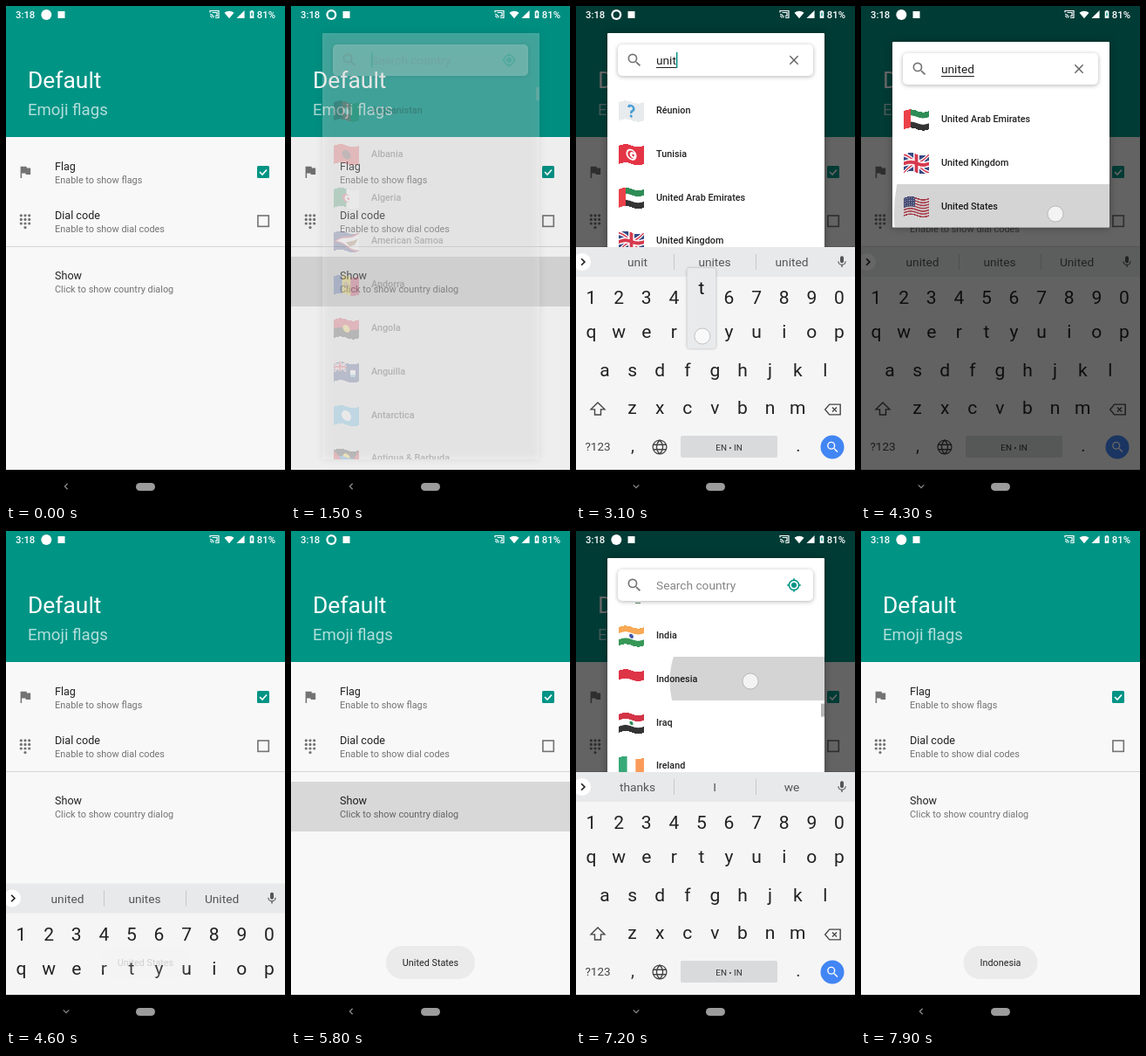
These frames come from a looping animation (320x569 px, 8900 ms). An HTML page with a canvas:

```html
<!DOCTYPE html>
<html lang="en">
<head>
<meta charset="utf-8">
<title>Country picker</title>
<style>
html, body { margin: 0; width: 100%; height: 100%; overflow: hidden; background: #000; }
canvas { display: block; }
</style>
</head>
<body>
<canvas id="stage" width="320" height="569"></canvas>
<script>
const LOOP = 8900, STEP = 100, TEAL = '#009485', GREY = '#737373', ROW = 49.8;
const stage = document.getElementById('stage').getContext('2d');
let c = stage, t = 0;

const ICON = {
  search: 'M15.5 14h-.79l-.28-.27A6.47 6.47 0 0 0 16 9.5 6.5 6.5 0 1 0 9.5 16c1.61 0 3.09-.59 4.23-1.57l.27.28v.79l5 4.99L20.49 19zm-6 0A4.5 4.5 0 1 1 14 9.5 4.5 4.5 0 0 1 9.5 14z',
  flag: 'M14.4 6L14 4H5v17h2v-7h5.6l.4 2h7V6z',
  mic: 'M12 14a3 3 0 0 0 3-3V5a3 3 0 0 0-6 0v6a3 3 0 0 0 3 3zm5.3-3a5.3 5.3 0 0 1-10.6 0H5a7 7 0 0 0 6 6.7V21h2v-3.3A7 7 0 0 0 19 11z',
  wifi: 'M12 21L0 7C7 1 17 1 24 7z',
  signal: 'M2 22h20V2z',
  battery: 'M7 4h3V2h4v2h3v18H7z',
  cast: 'M2 8V4h20v16h-8M2 16a4 4 0 0 1 4 4M2 12a8 8 0 0 1 8 8M7 8h11v8h-5',
  shift: 'M12 4l9 9h-5v7H8v-7H3z',
  erase: 'M8 5h15v14H8l-6-7zM12 9l6 6m0-6l-6 6',
  globe: 'M2 12a10 10 0 1 0 20 0a10 10 0 1 0-20 0M3 8.5h18M3 15.5h18M12 2c-6 6-6 14 0 20c6-6 6-14 0-20',
  locate: 'M4 12a8 8 0 1 0 16 0a8 8 0 1 0-16 0M12 1v3M12 20v3M1 12h3M20 12h3',
  close: 'M5 5l14 14M19 5L5 19',
  right: 'M9 6l6 6-6 6', left: 'M15 6l-6 6 6 6', down: 'M6 9l6 6 6-6',
  check: 'M4 12l6 6L20 7'
};

// name, band direction, band colours, optional emblem: colour x y radius
const countries = [
  ['Afghanistan', 'v', '#222 #c81e28 #007a3d', '#e9d3cf 14.5 10 3.5'],
  ['Albania', 'h', '#dc1f26', '#401515 14.5 10 5'],
  ['Algeria', 'v', '#0a7a42 #fff', '#d8203a 14.5 10 4.5'],
  ['American Samoa'],
  ['Andorra', 'v', '#1c3d9a #f7d417 #d0103a', '#b98a3a 14.5 10 3'],
  ['Angola', 'h', '#cc1126 #111', '#f3c531 14.5 10 4'],
  ['Anguilla'],
  ['Antarctica', 'h', '#3aa8dc', '#fff 14.5 10 5.5'],
  ['Antigua & Barbuda'],
  ['Argentina', 'h', '#75aadb #fff #75aadb', '#f5b52e 14.5 10 2.5'],
  ['Austria', 'h', '#d8202f #fff #d8202f'],
  ['Bangladesh', 'h', '#0a6a4e', '#e8304a 13 10 5.5'],
  ['Belgium', 'v', '#111 #f8d93a #e02b39'],
  ['Bolivia', 'h', '#d0301e #f6e000 #0a7a34'],
  ['Bulgaria', 'h', '#fff #0a9470 #d22b1e'],
  ['Chad', 'v', '#0a2a66 #fbc816 #c41030'],
  ['Estonia', 'h', '#2072c5 #111 #fff'],
  ['France', 'v', '#1c2f8c #fff #e5303c'],
  ['Germany', 'h', '#111 #d81010 #fbcb09'],
  ['Guinea', 'v', '#c81a28 #f9d116 #0a9458'],
  ['Hungary', 'h', '#c8303e #fff #43704d'],
  ['India', 'h', '#f79a35 #fff #15873a', '#23369b 14.5 10 2.4'],
  ['Indonesia', 'h', '#d81126 #fff'],
  ['Iraq', 'h', '#cc1126 #fff #111', '#0a7a3d 14.5 10 2'],
  ['Ireland', 'v', '#169b62 #fff #fb8a3e'],
  ['Italy', 'v', '#0a9246 #fff #cd2c38'],
  ['Réunion'],
  ['Tunisia'],
  ['United Arab Emirates'],
  ['United Kingdom'],
  ['United States']
];

const ramp = (a, b) => Math.min(1, Math.max(0, (t - a) / (b - a)));
const easeOut = p => 1 - (1 - p) ** 3;
const between = (a, b) => t >= a && t < b;

function rect(x, y, w, h, color, r = 0) {
  c.fillStyle = color;
  c.beginPath();
  c.roundRect(x, y, w, h, r);
  c.fill();
}
function disc(x, y, r, color) {
  c.fillStyle = color;
  c.beginPath();
  c.arc(x, y, r, 0, 7);
  c.fill();
}
function poly(color, ...xy) {
  c.fillStyle = color;
  c.beginPath();
  for (let i = 0; i < xy.length; i += 2) c.lineTo(xy[i], xy[i + 1]);
  c.fill();
}
function line(x1, y1, x2, y2, color, w) {
  c.strokeStyle = color;
  c.lineWidth = w;
  c.beginPath();
  c.moveTo(x1, y1);
  c.lineTo(x2, y2);
  c.stroke();
}
function text(s, x, y, size, color = '#222', align = 'left', weight = 400) {
  c.font = `${weight} ${size}px Roboto, sans-serif`;
  c.textAlign = align;
  c.fillStyle = color;
  c.fillText(s, x, y);
}
function icon(name, x, y, size, color, stroke) {
  const path = new Path2D(ICON[name]);
  c.save();
  c.translate(x, y);
  c.scale(size / 24, size / 24);
  c.translate(-12, -12);
  if (stroke) {
    c.strokeStyle = color;
    c.lineWidth = stroke * 24 / size;
    c.stroke(path);
  } else {
    c.fillStyle = color;
    c.fill(path, 'evenodd');
  }
  c.restore();
}
function clipped(x, y, w, h, draw) {
  c.save();
  c.beginPath();
  c.rect(x, y, w, h);
  c.clip();
  draw();
  c.restore();
}

function crescent(x, y, r, color, back) {
  disc(x, y, r, color);
  disc(x + r * .35, y, r * .78, back);
  disc(x + r * .5, y, r * .3, color);
}
function unionJack(w, h) {
  clipped(0, 0, w, h, () => {
    rect(0, 0, w, h, '#12286e');
    for (const [color, k] of [['#fff', .2], ['#d01830', .07]]) {
      line(0, 0, w, h, color, h * k);
      line(0, h, w, 0, color, h * k);
    }
    for (const [color, k] of [['#fff', .34], ['#d01830', .19]]) {
      line(w / 2, 0, w / 2, h, color, h * k);
      line(0, h / 2, w, h / 2, color, h * k);
    }
  });
}
const special = {
  'American Samoa'() {
    rect(0, 0, 29, 20, '#14226b');
    poly('#c0203a', 0, 10, 29, -1, 29, 21);
    poly('#fff', 3, 10, 29, 1, 29, 19);
    poly('#8a5a2c', 14, 11, 20, 8, 28, 6, 24, 12, 18, 14);
  },
  'Anguilla'() {
    rect(0, 0, 29, 20, '#14286e');
    unionJack(14.5, 10);
    rect(19, 6, 6, 8, '#fff', 2);
    rect(19, 11, 6, 3, '#4fb0d0', 1);
  },
  'Antigua & Barbuda'() {
    rect(0, 0, 29, 20, '#cc1126');
    poly('#111', 0, 0, 29, 0, 14.5, 20);
    disc(14.5, 8, 4, '#fbd116');
    poly('#1272c6', 6, 8, 23, 8, 14.5, 20);
    poly('#fff', 9.5, 13, 19.5, 13, 14.5, 20);
  },
  'Réunion'() {
    rect(0, 0, 29, 20, '#e4e8ea');
    text('?', 14.5, 17, 19, '#2a8fd0', 'center', 700);
  },
  'Tunisia'() {
    rect(0, 0, 29, 20, '#e01226');
    disc(14.5, 10, 6, '#fff');
    crescent(14.5, 10, 4.2, '#e01226', '#fff');
  },
  'United Arab Emirates'() {
    bands('h', ['#0a7a3a', '#fff', '#111']);
    rect(0, 0, 8, 20, '#e8202a');
  },
  'United Kingdom'() { unionJack(29, 20); },
  'United States'() {
    bands('h', Array.from({ length: 13 }, (_, i) => i % 2 ? '#fff' : '#c0283c'));
    rect(0, 0, 13, 10.8, '#2f3a76');
    for (let i = 0; i < 20; i++) disc(1.5 + i % 5 * 2.5, 1.6 + (i / 5 | 0) * 2.5, .5, '#fff');
  }
};
function bands(dir, colors) {
  const n = colors.length;
  colors.forEach((color, i) => dir === 'v'
    ? rect(i * 29 / n, 0, 29 / n + .1, 20, color)
    : rect(0, i * 20 / n, 29, 20 / n + .1, color));
}
const sheets = {};
function flagSheet([name, dir, colors, emblem]) {
  if (sheets[name]) return sheets[name];
  const sheet = document.createElement('canvas');
  sheet.width = 58;
  sheet.height = 40;
  c = sheet.getContext('2d');
  c.scale(2, 2);
  if (special[name]) special[name]();
  else bands(dir, colors.split(' '));
  if (emblem) {
    const [color, x, y, r] = emblem.split(' ');
    if (name === 'Algeria') crescent(+x, +y, +r, color, '#fff');
    else disc(+x, +y, +r, color);
  }
  c = stage;
  return sheets[name] = sheet;
}
function wavingFlag(country, x, y) {
  const sheet = flagSheet(country), alpha = c.globalAlpha;
  c.globalAlpha = alpha * .85;
  for (let i = 0; i < 29; i++)
    c.drawImage(sheet, i * 2, 0, 2, 40, x + i, y - 10 - 1.6 * Math.sin(i / 29 * 2 * Math.PI), 1, 21);
  c.globalAlpha = alpha;
}

// Typing
const strokes = [['u', 2200], ['n', 2500], ['i', 2800], ['t', 3000], ['e', 3300], ['d', 3700]];
const typedAt = time => time > 4800 ? '' : strokes.filter(s => s[1] <= time).map(s => s[0]).join('');
const suggestions = {
  '': 'thanks I we', u: 'u you us', un: 'un under until', uni: 'uni unit unique',
  unit: 'unit unites united', unite: 'unite unites united', united: 'united unites United'
};
const keyRows = [['1234567890', 17.5, 341], ['qwertyuiop', 17.5, 380], ['asdfghjkl', 33, 424], ['zxcvbnm', 64.5, 467]];
const keyX = (start, i) => start + i * 31.6;

function ripple(x, y, r, alpha) {
  disc(x, y, r, `rgba(0,0,0,${alpha})`);
}
function page() {
  rect(0, 0, 320, 569, '#f8f8f8');
  rect(0, 0, 320, 150, TEAL);
  text('Default', 25, 94, 26.4, '#fff');
  text('Emoji flags', 25, 125, 18.6, 'rgba(255,255,255,.7)');
  [['Flag', 'Enable to show flags', 188], ['Dial code', 'Enable to show dial codes', 244],
   ['Show', 'Click to show country dialog', 313]].forEach(([title, note, y]) => {
    text(title, 56, y, 12.6);
    text(note, 56, y + 15, 10.9, GREY);
  });
  icon('flag', 22, 190, 18.5, GREY);
  for (let i = 0; i < 9; i++) disc(17.3 + i % 3 * 4.7, 239.8 + (i / 3 | 0) * 4.6, 1.6, GREY);
  disc(22, 253.6, 1.6, GREY);
  rect(288, 183, 14, 14, TEAL, 1.5);
  icon('check', 295, 190, 12, '#fff', 1.6);
  c.strokeStyle = GREY;
  c.lineWidth = 1.6;
  c.strokeRect(288.9, 240, 12.4, 12.4);
  rect(0, 275, 320, 1, '#d4d4d4');
  for (const [down, full, fade, end] of [[1100, 1400, 1600, 1900], [5500, 5800, 6000, 6300]]) {
    if (between(down, end)) clipped(0, 287, 320, 57, () =>
      ripple(190, 316, 230 * ramp(down, full), .13 * (1 - ramp(fade, end))));
  }
}

function dialog(fade) {
  const second = t > 5000, typed = typedAt(t), query = typedAt(t - 150);
  const list = second ? countries : countries.filter(([name]) => name.toLowerCase().includes(query));
  const small = list.length < 4;
  const top = small ? 41 : 31, height = small ? 63 + list.length * ROW : 488;
  const target = countries.findIndex(([name]) => name === 'Indonesia');
  const scroll = second ? (target - 1) * ROW * easeOut(ramp(6800, 7200)) : 0;
  c.save();
  c.globalAlpha = fade;
  c.shadowColor = 'rgba(0,0,0,.35)';
  c.shadowBlur = 8;
  rect(36, top, 249, height, '#fff', 1);
  c.shadowColor = 'transparent';
  clipped(36, top + 51, 249, height - 51, () => {
    list.forEach((country, i) => {
      const y = top + 88 + i * ROW - scroll;
      if (y < top || y > 545) return;
      wavingFlag(country, 49, y + 1);
      text(country[0], 92, y + 4, 10.8, '#222', 'left', 500);
    });
    if (!second && t >= 4200) clipped(36, 204, 249, 49, () => ripple(223, 238, 185 * ramp(4100, 4300), .17));
    if (t >= 7200) clipped(36, 144, 249, 50, () => ripple(200, 172, 185 * ramp(7100, 7300), .17));
    if (!typed) rect(281, 93 + scroll * .1, 4, 15, '#b5b5b5');
  });
  c.shadowColor = 'rgba(0,0,0,.3)';
  c.shadowBlur = 5;
  c.shadowOffsetY = 1;
  const y = top + 31;
  rect(48, y - 18, 224, 36, '#fff', 5);
  c.shadowColor = 'transparent';
  icon('search', 67, y, 20, GREY);
  if (typed) {
    text(typed, 92, y + 5, 13.7);
    const w = c.measureText(typed).width;
    rect(92, y + 8, w, 1, '#222');
    if (t < 3900) rect(92 + w, y - 9, 1.5, 18, TEAL);
    icon('close', 250, y, 16, '#666', 1.5);
  } else {
    text('Search country', 92, y + 5, 13.7, '#858585');
    if (t < 3900) rect(92, y - 9, 1.5, 18, TEAL);
    icon('locate', 250, y, 17, TEAL, 1.6);
    disc(250, y, 3, TEAL);
  }
  c.restore();
}

function keyboard(shown) {
  c.save();
  c.beginPath();
  c.rect(0, 0, 320, 531);
  c.clip();
  c.translate(0, 255 * (1 - shown));
  rect(0, 276, 320, 255, '#f5f5f5');
  rect(0, 276, 320, 34, '#e8e9ea');
  disc(7, 293, 10, '#fff');
  icon('right', 8, 293, 15, '#222', 1.7);
  suggestions[typedAt(t)].split(' ').forEach((word, i) => text(word, 70.5 + i * 88.5, 298, 13.7, '#555', 'center'));
  rect(112, 284, 1, 18, '#c8c8c8');
  rect(206, 284, 1, 18, '#c8c8c8');
  icon('mic', 305, 293, 16, '#555');
  for (const [keys, x, y] of keyRows)
    [...keys].forEach((key, i) => text(key, keyX(x, i), y, 21, '#222', 'center'));
  icon('shift', 25, 461, 21, '#444', 1.4);
  icon('erase', 294, 462, 20, '#444', 1.4);
  text('?123', 25, 509, 13.5, '#444', 'center');
  text(',', 65, 510, 20, '#333', 'center');
  icon('globe', 96, 505, 19, '#444', 1.3);
  rect(120, 492, 111, 25, '#d9dadb', 2);
  text('EN • IN', 175.5, 508.5, 9.8, '#333', 'center');
  text('.', 255, 510, 20, '#333', 'center');
  disc(294, 505, 13.5, '#4285f4');
  icon('search', 294.5, 505, 17, '#fff');
  for (const [key, time] of strokes) if (between(time, time + 200)) {
    const [keys, start, y] = keyRows.find(([k]) => k.includes(key));
    const x = keyX(start, keys.indexOf(key));
    c.shadowColor = 'rgba(0,0,0,.3)';
    c.shadowBlur = 3;
    rect(x - 16.5, y - 80, 33, 92, '#e9eaeb', 3);
    c.shadowColor = 'transparent';
    text(key, x, y - 50, 21, '#111', 'center');
    touch(x + 1, y - 2);
  }
  c.restore();
}

function touch(x, y) {
  disc(x, y, 9, 'rgba(255,255,255,.72)');
  c.strokeStyle = 'rgba(110,110,110,.35)';
  c.lineWidth = 1;
  c.stroke();
}

function toast(label, alpha) {
  if (!alpha) return;
  c.save();
  c.globalAlpha = alpha;
  c.font = '400 10.8px Roboto, sans-serif';
  const w = c.measureText(label).width + 38;
  rect(160 - w / 2, 475, w, 38, 'rgba(234,234,234,.94)', 19);
  text(label, 160, 498, 10.8, '#222', 'center');
  c.restore();
}

function systemBars(typing) {
  text('3:18', 11, 14, 11.3, '#fff', 'left', 500);
  disc(46.3, 10, 6, '#fff');
  if (between(900, 3800) || between(5400, 6200)) disc(46.3, 10, 3.7, fadeColor);
  rect(59.5, 6, 8, 8, '#fff');
  icon('cast', 239, 9.5, 12, '#fff', 1.2);
  icon('wifi', 256, 10, 11, '#fff');
  icon('signal', 269, 9.5, 11, '#fff');
  icon('battery', 282, 9.5, 11, '#fff');
  rect(281.3, 7.5, 1.4, 4, TEAL);
  text('81%', 309, 14, 11.3, '#fff', 'right', 500);
  rect(0, 531, 320, 38, '#000');
  icon(typing ? 'down' : 'left', 69, 550, 13, '#8a8a8a', 1.3);
  rect(149, 546, 22, 9, '#9c9c9c', 4.5);
}

let fadeColor = TEAL;
function draw(now) {
  t = Math.floor(now % LOOP / STEP) * STEP;
  const fade = t < 5000
    ? ramp(1450, 1650) * (1 - ramp(4400, 4600))
    : ramp(5850, 6050) * (1 - ramp(7350, 7550));
  const shown = t < 5000
    ? easeOut(ramp(1700, 2000)) * (1 - ramp(4450, 4750))
    : easeOut(ramp(6100, 6400)) * (1 - ramp(7400, 7650));
  const behind = between(4200, 5000) || t >= 7300;
  const dim = .6 * fade * fade;
  fadeColor = `rgb(0,${148 * (1 - dim)},${133 * (1 - dim)})`;

  page();
  if (shown && behind) keyboard(shown);
  rect(0, 0, 320, 531, `rgba(0,0,0,${dim})`);
  if (fade) dialog(fade);
  if (shown && !behind) keyboard(shown);
  toast('United States', ramp(4550, 4850) * (1 - ramp(6850, 7100)));
  toast('Indonesia', ramp(7450, 7700));
  systemBars(shown > .1);
  for (const [start, end, x, y] of [[1100, 1400, 190, 316], [4100, 4400, 223, 238], [5600, 5800, 190, 316],
                                    [7200, 7400, 200, 172]])
    if (between(start, end)) touch(x, y);
}

const begin = performance.now();
function tick() {
  draw(performance.now() - begin);
  requestAnimationFrame(tick);
}
tick();
</script>
</body>
</html>
```
